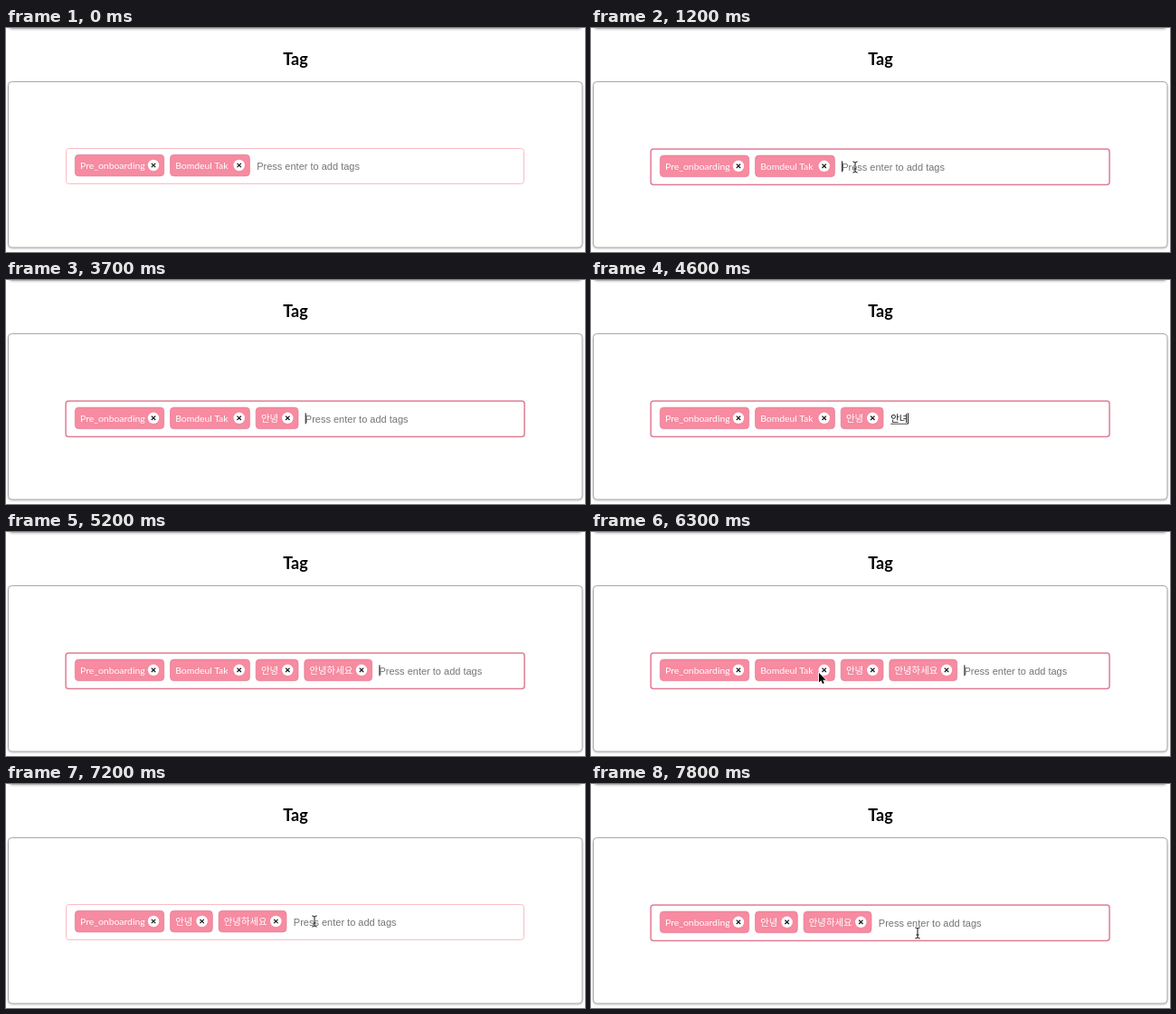
These frames come from a looping animation (640 px wide and 248 px high, 8 s). An HTML page:

```html
<!DOCTYPE html>
<html lang="ko">
<head>
<meta charset="utf-8">
<title>Tag</title>
<style>
  html, body { margin: 0; width: 100%; height: 100%; overflow: hidden; background: #fff; }
  svg { display: block; width: 640px; height: 248px; }
  text { white-space: pre; }
  .title { font: 700 18px Lato, sans-serif; text-anchor: middle; }
  .label { font: 400 10.4px Lato, "Noto Sans CJK KR", "Noto Sans CJK", sans-serif; fill: #fff; }
  .hangul { font-weight: 500; }
  .hint { font: 11px "Liberation Sans", Arial, sans-serif; fill: #757575; }
  .typed { font: 10.4px "Noto Sans CJK KR", "Noto Sans CJK", sans-serif; fill: #111; }
  .card { fill: #fff; stroke: #a9a9a9; filter: drop-shadow(.5px 1px 1px #0003); }
  .tag { fill: #f68ba1; stroke: #e27b92; stroke-width: .7; }
</style>
</head>
<body>
<svg viewBox="0 0 640 248">
  <rect class="card" x="2.5" y="-40" width="634.5" height="40.3" rx="4"/>
  <text class="title" x="320" y="41">Tag</text>
  <rect class="card" x="2.5" y="59.5" width="634.5" height="183.5" rx="4"/>
  <g id="field"></g>
  <g id="pointer"></g>
</svg>
<script>
const LOOP = 8000, STEP = 100, CHAR = 9.6, GAP = 6.2;
const field = document.getElementById('field');
const pointer = document.getElementById('pointer');

// Each tag exists from `from` until `to`.
const tags = [
  { text: 'Pre_onboarding', width: 99, from: 0, to: LOOP },
  { text: 'Bomdeul Tak', width: 88.5, from: 0, to: 6700 },
  { text: '안녕', width: 47.4, from: 3700, to: LOOP, hangul: true },
  { text: '안녕하세요', width: 75.5, from: 5200, to: LOOP, hangul: true },
];

const typing = [
  [0, ''], [2400, 'ㅇ'], [2500, '아'], [2900, '안'], [3100, '안ㄴ'], [3200, '안녀'], [3300, '안녕'],
  [3700, ''], [4000, 'ㅇ'], [4100, '아'], [4300, '안'], [4400, '안ㄴ'], [4600, '안녀'], [4700, '안녕'],
  [4800, '안녕하'], [4900, '안녕하세'], [5100, '안녕하세요'], [5200, ''],
];

const focusSpans = [[1200, 6600], [7300, LOOP]];
const caretSpans = [[1200, 1700], [2300, 5700], [6200, 6600], [7300, 7800]];
const pointerSpans = [[200, 2300], [5800, LOOP]];

// time, x, y
const pointerPath = [
  [200, 402, 225], [500, 342, 192], [800, 258, 163], [1000, 292, 154], [1200, 292, 154],
  [1500, 300, 165], [5800, 300, 165], [6100, 234, 166], [6300, 252, 156], [6500, 256, 152],
  [6700, 256, 152], [7200, 341, 152], [7400, 341, 152], [7600, 361, 165], [LOOP, 361, 165],
];

const within = (spans, t) => spans.some(([from, to]) => t >= from && t < to);

function pointerAt(t) {
  const i = Math.max(1, pointerPath.findIndex(([time]) => time > t));
  const [t0, x0, y0] = pointerPath[i - 1], [t1, x1, y1] = pointerPath[i];
  const k = (t - t0) / (t1 - t0);
  return [x0 + (x1 - x0) * k, y0 + (y1 - y0) * k];
}

function tagMarkup({ text, width, hangul }, x) {
  const cx = x + width - 12;
  return `<rect class="tag" x="${x + .3}" y="140.3" width="${width - .6}" height="23.6" rx="4"/>
    <text class="label ${hangul ? 'hangul' : ''}" x="${x + 6}" y="155.8">${text}</text>
    <circle cx="${cx}" cy="152" r="6.2" fill="#fff"/>
    <path d="M${cx - 2.2} 149.8l4.4 4.4m0-4.4l-4.4 4.4" stroke="#111" stroke-width="1.2"/>`;
}

function drawField(t) {
  const focused = within(focusSpans, t);
  let x = 76, content = '';
  for (const tag of tags.filter(({ from, to }) => t >= from && t < to)) {
    content += tagMarkup(tag, x);
    x += tag.width + GAP;
  }
  const inputX = x + 1.7;
  const typed = typing.filter(([time]) => time <= t).pop()[1];
  const typedWidth = typed.length * CHAR;

  content += typed
    ? `<text class="typed" x="${inputX}" y="156.6">${typed}</text>
       <path d="M${inputX} 158.5h${typedWidth}" stroke="#222" stroke-width=".8"/>`
    : `<text class="hint" x="${inputX - .4}" y="156.8">Press enter to add tags</text>`;
  if (within(caretSpans, t))
    content += `<rect x="${inputX + typedWidth - .5}" y="146.5" width="1" height="12" fill="#111"/>`;

  const frame = focused
    ? '<rect x="66.1" y="134" width="507" height="39.4" rx="3" fill="none" stroke="#df7d94" stroke-width="1.5"/>'
    : '<rect x="66.5" y="133.5" width="506" height="39" rx="3" fill="none" stroke="#fbbcc4"/>';
  field.innerHTML = `${frame}<g transform="translate(0 ${focused ? .8 : 0})">${content}</g>`;
  return inputX;
}

function drawPointer(t, inputX) {
  if (!within(pointerSpans, t)) return void (pointer.innerHTML = '');
  const [x, y] = pointerAt(t);
  const overInput = x >= inputX - 2 && y > 140 && y < 168;
  const beam = 'M-2.6-6Q0-6 0-4.4Q0-6 2.6-6M0-4.4V4.4M-2.6 6Q0 6 0 4.4Q0 6 2.6 6M-1.5 2H1.5';
  const arrow = 'M0 0V10.5L2.4 8.3L4 12L5.8 11.2L4.2 7.7H7.6Z';
  pointer.setAttribute('transform', `translate(${x} ${y})`);
  pointer.innerHTML = overInput
    ? `<path d="${beam}" fill="none" stroke="#fff" stroke-width="2"/>
       <path d="${beam}" fill="none" stroke="#111"/>`
    : `<path d="${arrow}" stroke="#fff" stroke-width="1.4" paint-order="stroke"/>`;
}

let shown = -1;
function tick() {
  const t = Math.floor((performance.now() % LOOP) / STEP) * STEP;
  if (t !== shown) {
    shown = t;
    drawPointer(t, drawField(t));
  }
  requestAnimationFrame(tick);
}
tick();
</script>
</body>
</html>
```
